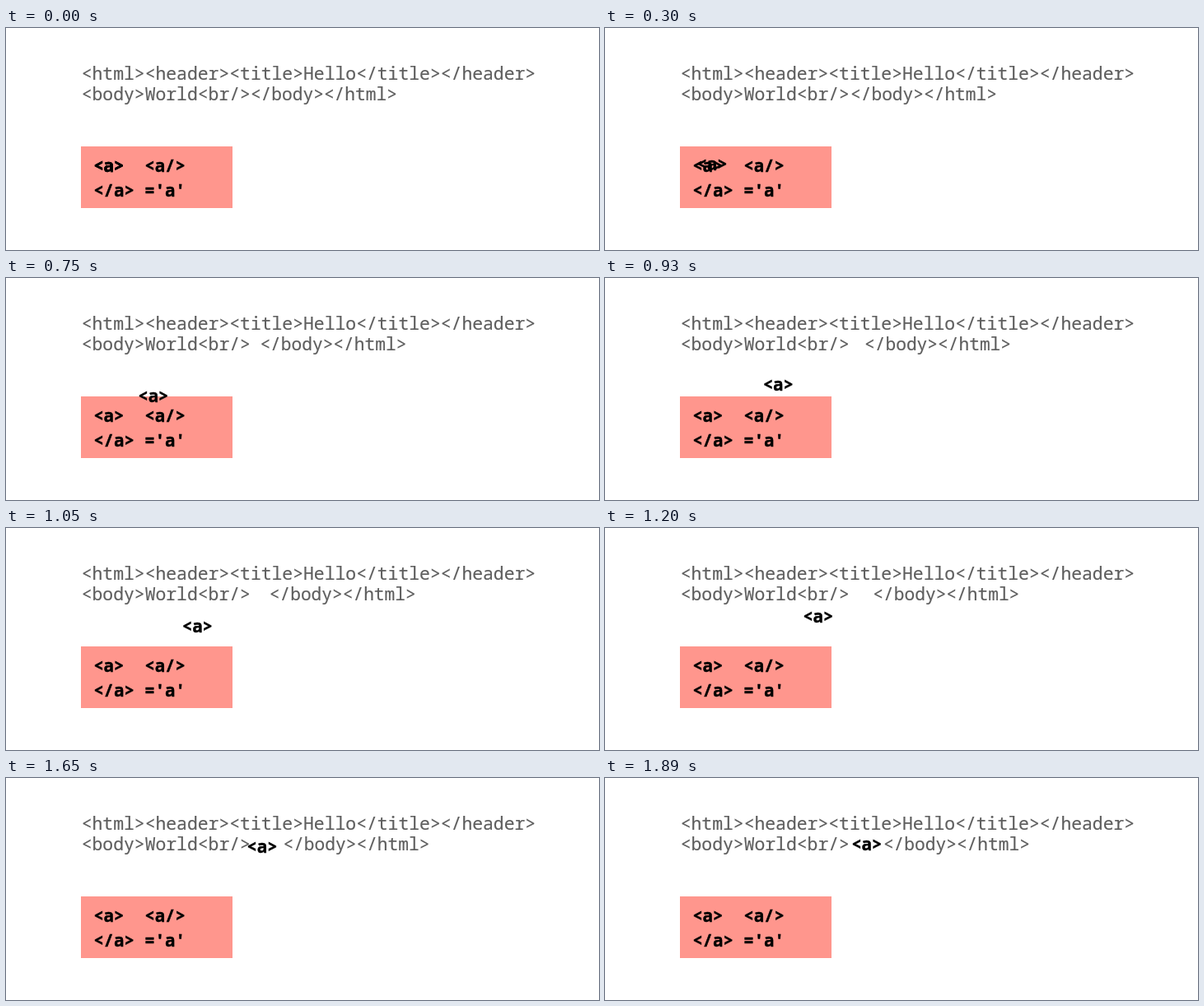
An HTML page that plays this animation: 720x270 px, repeating every 2.01 s.

```html
<!DOCTYPE html>
<html lang="en">
<head>
<meta charset="utf-8">
<title>Inserting a tag</title>
<style>
  html, body { margin: 0; width: 100%; height: 100%; overflow: hidden; background: #fff; }
  svg { display: block; }
  text { font-family: "Noto Sans Mono", "DejaVu Sans Mono", monospace; white-space: pre; font-variant-ligatures: none; }
  .code { font-size: 21.39px; fill: #5e5e5e; stroke: #5e5e5e; stroke-width: .2px; }
  .tag { font-size: 20.7px; font-weight: 700; fill: #000; stroke: #000; stroke-width: .5px; }
  #tail { font-size: 21.2px; }
</style>
</head>
<body>
<svg width="720" height="270" viewBox="0 0 720 270">
  <rect x="91" y="144" width="184" height="75" fill="#ff968d"/>
  <g class="code">
    <text x="91.7" y="62.5">&lt;html>&lt;header>&lt;title>Hello&lt;/title>&lt;/header></text>
    <text x="91.7" y="88.2">&lt;body>World&lt;br/></text>
    <text id="tail" x="296.9" y="88.2">&lt;/body>&lt;/html></text>
  </g>
  <g class="tag">
    <text x="106.2" y="175.3" xml:space="preserve">&lt;a>  &lt;a/></text>
    <text x="106.2" y="204.8" xml:space="preserve">&lt;/a> ='a'</text>
    <text id="mover" x="106.2" y="175.3">&lt;a></text>
  </g>
</svg>
<script>
const LOOP = 2010, STEP = 30, START = 90, LENGTH = 1800;
const tail = document.getElementById('tail');
const mover = document.getElementById('mover');

// Cubic Bézier (0.42, 0, 0.58, 1), solved by bisection
function easeInOut(u) {
  if (u <= 0 || u >= 1) return u <= 0 ? 0 : 1;
  let lo = 0, hi = 1;
  for (let i = 0; i < 24; i++) {
    const s = (lo + hi) / 2, r = 1 - s;
    const x = 1.26 * s * r * r + 1.74 * s * s * r + s * s * s;
    if (x < u) lo = s; else hi = s;
  }
  return lo * lo * (3 - 2 * lo);
}

function shift(el, dx, dy) {
  el.setAttribute('transform', `translate(${dx} ${dy})`);
}

function draw() {
  const t = Math.floor(performance.now() % LOOP / STEP) * STEP;
  const p = easeInOut((t - START) / LENGTH);
  shift(tail, 41 * p, 0);
  shift(mover, 193 * p, -87 * p);
  requestAnimationFrame(draw);
}
draw();
</script>
</body>
</html>
```
